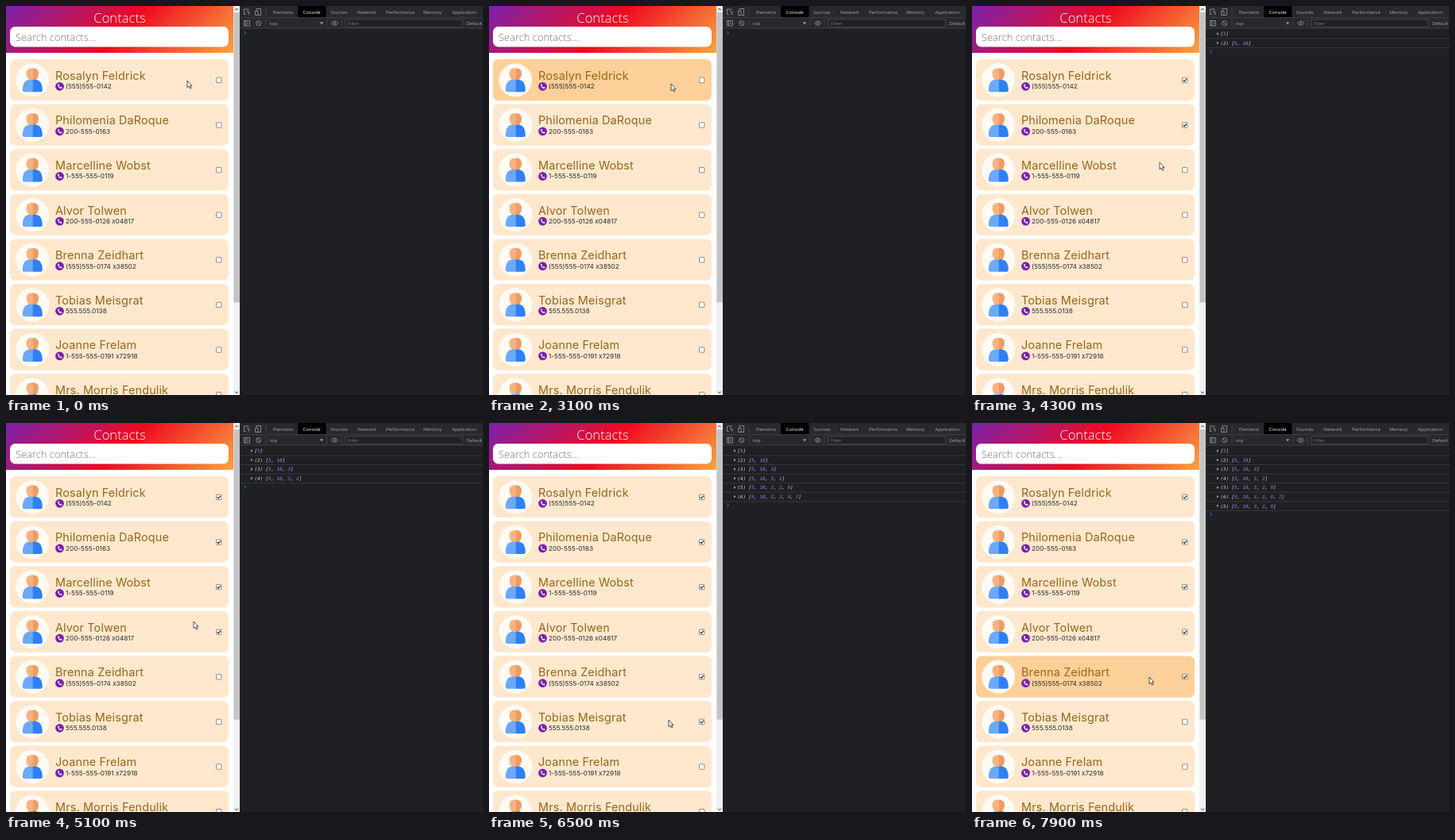
An HTML page for the animation above (8000 ms loop, 600x490 px).

```html
<!DOCTYPE html>
<html lang="en">
<head>
<meta charset="utf-8">
<title>Contacts</title>
<style>
html, body { margin: 0; width: 100%; height: 100%; overflow: hidden; background: #fff; }
svg { position: absolute; left: 0; top: 0; display: block; }
header { position: absolute; left: 0; top: 0; width: 286px; height: 59px;
  background: linear-gradient(135deg, #7b22ad, #ef0a20 52%, #f9a440); }
text { white-space: pre; }
.light { font-family: "Open Sans", sans-serif; font-weight: 300; }
.name { font: 400 14.4px Inter, sans-serif; letter-spacing: .15px; fill: #996517; }
.phone { font: 400 8.2px Inter, sans-serif; fill: #2c2a28; }
.tool { font: 400 5.9px "Open Sans", sans-serif; fill: #a5a8ac; }
.log { font: italic 5.8px "DejaVu Sans Mono", monospace; fill: #d8d9dc; }
.log .num { fill: #9a80ff; }
.icon { fill: none; stroke: #9a9da1; stroke-width: .8; }
</style>
</head>
<body>
<header></header>
<svg id="stage" width="600" height="490" viewBox="0 0 600 490">
  <defs>
    <g id="avatar">
      <circle r="21" fill="#fefaf4"/>
      <path d="M0-15C-6-15-8-12-7.6-7C-7-2-4 1 0 1Z" fill="#f6b281"/>
      <path d="M0-15C6-15 8-12 7.6-7C7-2 4 1 0 1Z" fill="#ee9c62"/>
      <path d="M0 0C-8-2-12.5 3-12.5 13Q-12.5 15-10 15H0Z" fill="#6ca9fa"/>
      <path d="M0 0C8-2 12.5 3 12.5 13Q12.5 15 10 15H0Z" fill="#2e80f4"/>
    </g>
    <g id="call">
      <circle r="5.4" fill="#7c1fae"/>
      <path d="M-2.5-2.4L-1.2-3L-.3-1.2L-1-.5Q-.4.7.7 1.1L1.4.4L3 1.3L2.4 2.6Q-1.8 2.8-2.5-2.4Z" fill="#fff"/>
    </g>
  </defs>

  <text class="light" x="143" y="21" font-size="16.6" fill="#fff" text-anchor="middle">Contacts</text>
  <rect x="5" y="26" width="275" height="25.5" rx="6.5" fill="#fff"/>
  <text class="light" x="12" y="43.5" font-size="12.9" fill="#757575">Search contacts...</text>
  <g id="cards"></g>

  <rect x="286" width="8" height="490" fill="#f1f1f1"/>
  <rect x="286.5" y="8" width="7.5" height="365.5" fill="#c4c4c4"/>
  <path d="M288 5.5l2-2.5l2 2.5M288 485.5l2 2.5l2-2.5" fill="none" stroke="#555"/>

  <rect x="294" width="306" height="490" fill="#1f2023"/>
  <rect x="294" width="306" height="28" fill="#28292c"/>
  <rect x="367" width="35.5" height="14.5" fill="#000"/>
  <path d="M294 14.6H600M294 28H600" stroke="#434548" stroke-width=".8"/>
  <g class="icon">
    <path d="M305 5.5V4H299.5V10.5H302M302.5 6.5l4 1.7l-1.8.8l1.8 2.3"/>
    <path d="M315 6V3.5H320.5V11.5H317M313.5 6.5H317V11.5H313.5Z"/>
    <path d="M299.5 18.5H306.5V25H299.5ZM301.5 18.5V25M303 20.2l1.8 1.5l-1.8 1.5"/>
    <circle cx="317.7" cy="21.7" r="3"/><path d="M315.6 19.6l4.2 4.2"/>
    <path d="M409.2 21.7Q413.5 16.5 417.8 21.7Q413.5 26.9 409.2 21.7Z"/>
    <circle cx="413.5" cy="21.7" r="1.1"/>
    <path d="M327 3V12M327 17V26M404 17V26M422 17V26" stroke="#44464a"/>
  </g>
  <path d="M395 20.2h4l-2 3.4z" fill="#9a9da1"/>
  <rect x="427" y="17" width="147" height="9.5" fill="#202124" stroke="#505257" stroke-width=".7"/>
  <g id="tools"></g>
  <g id="logs"></g>
  <path id="prompt" d="M299.5-2l2 2l-2 2" fill="none" stroke="#4c82e8" stroke-width=".9"/>
  <path id="cursor" d="M0 0V8.7L2 6.9L3.4 10L4.9 9.3L3.5 6.4H6Z" fill="#fff" stroke="#29262b" stroke-width=".8"/>
</svg>
<script>
const $ = id => document.getElementById(id);
const PITCH = 56.6, LINE = 11.55, LOOP = 8000;

const contacts = [
  ["Rosalyn Feldrick", "(555)555-0142"],
  ["Philomenia DaRoque", "200-555-0163"],
  ["Marcelline Wobst", "1-555-555-0119"],
  ["Alvor Tolwen", "200-555-0126 x04817"],
  ["Brenna Zeidhart", "(555)555-0174 x38502"],
  ["Tobias Meisgrat", "555.555.0138"],
  ["Joanne Frelam", "1-555-555-0191 x72918"],
  ["Mrs. Morris Fendulik", ""]
];
const ids = [5, 10, 3, 2, 9, 7];

// Each click: press time, release time, card index
const clicks = [
  [3000, 3300, 0], [3800, 4000, 1], [4400, 4600, 2], [4800, 5000, 3],
  [5500, 5700, 4], [6200, 6400, 5], [7200, 7400, 5], [7800, 8100, 4]
];

// Pointer stops: time, x, y
const path = [
  [0, 228, 94], [400, 226, 94], [1900, 226, 94], [2400, 229, 94], [2700, 229, 94],
  [3000, 229, 98], [3300, 229, 98], [3700, 234, 146], [4000, 235, 147],
  [4300, 236, 197], [4600, 236, 198], [4800, 236, 250], [5100, 236, 250],
  [5500, 232, 312], [5700, 232, 314], [6100, 226, 374], [7400, 226, 374],
  [7700, 223, 320], [8000, 223, 320]
];

const label = (x, y, s, cls, extra = "") =>
  `<text class="${cls}" x="${x}" y="${y}" ${extra}>${s}</text>`;

$("cards").innerHTML = contacts.map(([name, phone], i) => `
  <g transform="translate(0 ${67 + PITCH * i})">
    <rect class="card" x="5" width="275" height="52.3" rx="7" fill="#fde8ce"/>
    <use href="#avatar" x="33.3" y="26.3"/>
    ${label(62, 25.8, name, "name")}
    <use href="#call" x="67.5" y="34.3"/>
    ${label(75, 37.2, phone, "phone")}
    <rect x="264.5" y="23.2" width="6.4" height="6.4" rx=".6" fill="#fff" stroke="#77716b" stroke-width=".8"/>
    <path class="tick" d="M265.7 26.4l1.5 1.6l2.7-3.2" fill="none" stroke="#222" stroke-width="1.1"/>
  </g>`).join("");

$("tools").innerHTML = [
  [336, "Elements"], [373.5, "Console", "#fff"], [408, "Sources"], [442, "Network"],
  [478, "Performance"], [525, "Memory"], [561, "Application"]
].map(([x, s, c = "#a5a8ac"]) => label(x, 9.7, s, "tool", `style="fill:${c}"`)).join("") +
  label(332, 23.8, "top", "tool") + label(430, 23.8, "Filter", "tool", 'style="fill:#797c80"') +
  label(579, 23.8, "Default levels", "tool");

$("logs").innerHTML = [1, 2, 3, 4, 5, 6, 5].map((n, i) => {
  const y = 35 + LINE * i;
  const list = ids.slice(0, n).map(v => `<tspan class="num">${v}</tspan>`).join(", ");
  return `<g><path d="M308 ${y - 1.8}l2.5 1.8l-2.5 1.8z" fill="#a0a3a7"/>
    ${label(312.5, y + 2.2, (n > 1 ? `(${n}) ` : "") + `[${list}]`, "log")}
    <path d="M294 ${y + 6}H600" stroke="#3b3d41" stroke-width=".8"/></g>`;
}).join("");

const cards = document.querySelectorAll(".card");
const ticks = document.querySelectorAll(".tick");
const logs = [...$("logs").children];
const show = (el, on) => el.setAttribute("visibility", on ? "visible" : "hidden");

function pointer(t) {
  const k = path.findIndex(p => p[0] > t);
  const [t0, x0, y0] = path[k - 1], [t1, x1, y1] = path[k];
  const u = (t - t0) / (t1 - t0), e = u * u * (3 - 2 * u);
  return [x0 + (x1 - x0) * e, y0 + (y1 - y0) * e];
}

function draw(now) {
  const t = Math.floor(now % LOOP / 100) * 100;
  const done = clicks.filter(c => c[1] <= t);
  cards.forEach((card, i) => {
    const pressed = clicks.some(c => c[2] === i && t >= c[0] && t < c[1]);
    card.setAttribute("fill", pressed ? "#fdd099" : "#fde8ce");
    show(ticks[i], done.filter(c => c[2] === i).length % 2);
  });
  logs.forEach((log, i) => show(log, i < done.length));
  $("prompt").setAttribute("transform", `translate(0 ${34.2 + LINE * done.length})`);
  $("cursor").setAttribute("transform", `translate(${pointer(t)})`);
  requestAnimationFrame(draw);
}
draw(performance.now());
</script>
</body>
</html>
```
